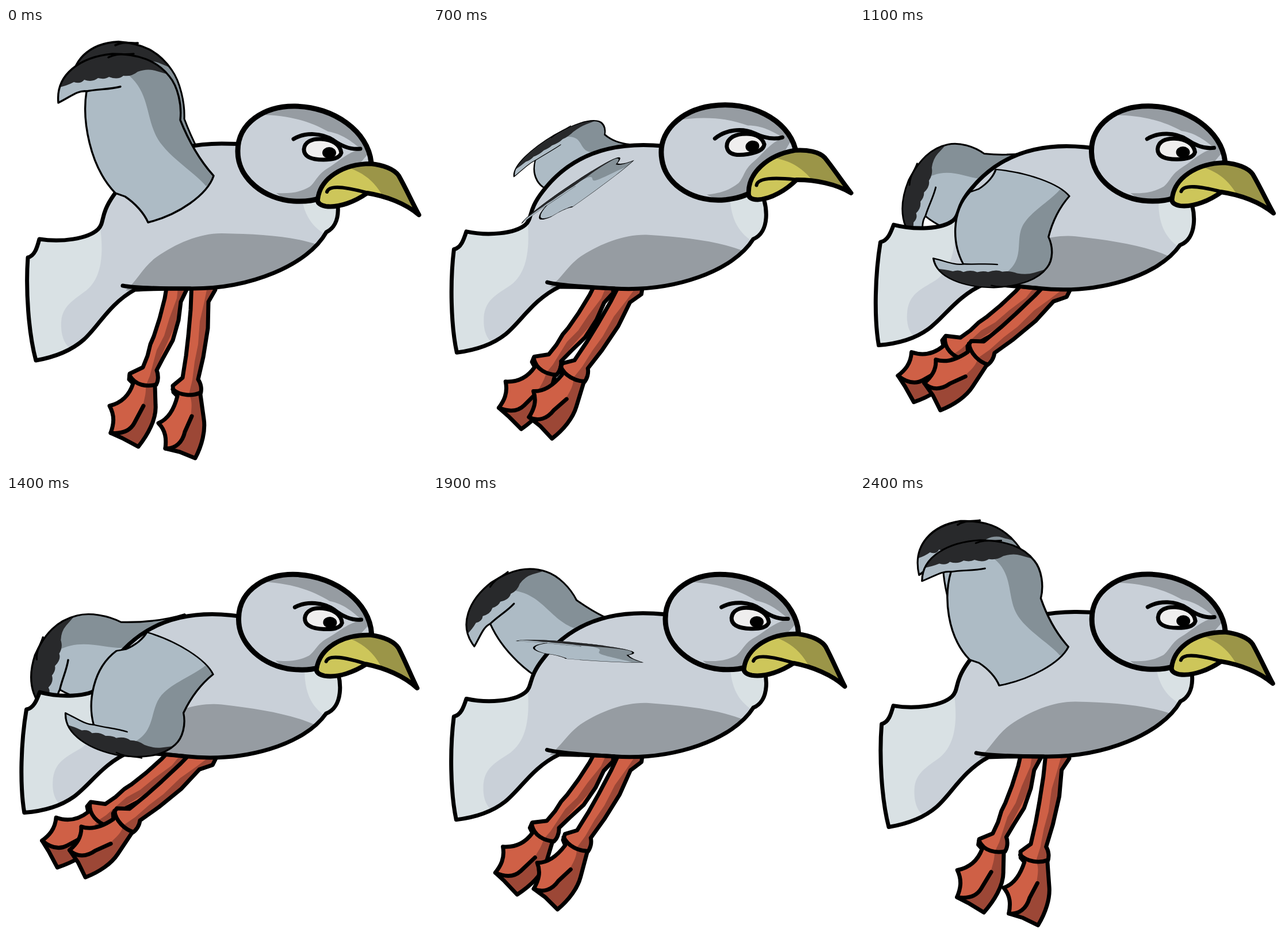
Animation of 732 by 765 pixels, one loop 2.5 s. Source, as an HTML page:

```html
<!DOCTYPE html>
<html lang="en">
<head>
<meta charset="utf-8">
<title>Flying gull</title>
<style>
  html, body { margin: 0; width: 100%; height: 100%; overflow: hidden; background: #fff; }
  svg { display: block; }
  path, ellipse { stroke-linejoin: round; stroke-linecap: round; }
  .line { fill: none; stroke: #000; stroke-width: 7; }
  .plume { fill: #c9d0d8; }
  .pale { fill: #d9e1e4; }
  .shade { fill: #969ca2; }
  .leg { fill: #cf6046; }
  .legShade { fill: #9c4736; }
</style>
</head>
<body>
<svg width="732" height="765" viewBox="0 0 732 765">
  <defs>
    <path id="bodyShape" d="M58 367C95 373 142 367 160 350C172 338 163 325 187 291C225 235 285 201 375 201L430 202L560 260C583 298 584 342 557 355C525 412 425 454 320 453C285 453 255 453 224 455C180 479 160 520 135 542C110 564 80 573 52 578C39 530 34 455 38 399C50 396 54 382 58 367Z"/>
    <path id="headShape" d="M403 215C402 165 450 135 503 136C570 137 630 180 635 234L545 296C535 300 520 302 500 301C450 298 403 262 403 215Z"/>
    <path id="beakShape" d="M542 298C546 262 585 236 634 236C655 238 675 245 683 257C696 280 706 303 718 325C695 305 660 292 628 287C608 301 580 313 556 310C546 308 541 304 542 298Z"/>
    <path id="farLegShape" d="M281 440L276 470L267 505L257 536L251 550L246 570L238 590L215 601L214 611L221 618C214 640 200 652 180 657C190 675 187 690 182 704L202 713L230 728C246 708 262 680 260 655L259 622C266 616 265 602 262 595L274 572L290 543L300 508L304 476L314 455L310 440Z"/>
    <path id="nearLegShape" d="M323 440L321 490L317 535L313 570L307 608L290 622L291 633L298 640C292 664 282 680 265 687C278 700 279 715 277 731L302 737L329 748C341 725 347 700 344 680L338 637C341 628 339 618 334 611L343 572L351 522L352 476L364 455L360 440Z"/>
    <path id="wingShape" d="M361 257C335 228 315 190 303 160C306 134 299 102 284 84C262 56 230 45 185 45C130 50 86 80 91 130C113 119 125 108 140 110C132 160 145 240 190 287L207 293C225 305 240 322 247 338C300 325 350 290 361 257Z"/>
    <clipPath id="bodyClip"><use href="#bodyShape"/></clipPath>
    <clipPath id="headClip"><use href="#headShape"/></clipPath>
    <clipPath id="beakClip"><use href="#beakShape"/></clipPath>
    <clipPath id="farLegClip"><use href="#farLegShape"/></clipPath>
    <clipPath id="nearLegClip"><use href="#nearLegShape"/></clipPath>
    <clipPath id="wingClip"><use href="#wingShape"/></clipPath>
    <g id="wing">
      <use href="#wingShape" fill="#adbbc5"/>
      <g clip-path="url(#wingClip)">
        <path fill="#849097" d="M208 78C255 112 240 165 271 203C292 230 328 252 348 275L375 257L320 150L285 60Z"/>
        <path fill="#28292b" d="M88 104Q105 101 118 94Q130 98 136 90Q150 95 160 87Q172 90 179 85Q195 91 204 83Q218 85 229 76Q245 70 259 74Q278 80 296 84L280 40L120 30Z"/>
      </g>
      <g class="line" style="stroke-width:3.4">
        <use href="#wingShape"/>
        <path d="M140 110C160 106 180 107 199 102M178 51C194 43 206 47 222 45"/>
      </g>
    </g>
  </defs>

  <use id="farWing" href="#wing"/>

  <g id="farLeg">
    <use href="#farLegShape" class="leg"/>
    <g class="legShade" clip-path="url(#farLegClip)">
      <path d="M300 440L297 470L284 505L275 535L262 560L250 605L243 622C244 640 238 650 239 657L222 689C212 704 195 706 182 704L230 735L275 690L270 570L330 440Z"/>
    </g>
    <g class="line">
      <use href="#farLegShape"/>
      <path d="M215 604C225 622 245 624 261 620M182 704C202 706 216 700 223 687L239 657"/>
    </g>
  </g>

  <g id="nearLeg">
    <use href="#nearLegShape" class="leg"/>
    <g class="legShade" clip-path="url(#nearLegClip)">
      <path d="M352 440L345 475L337 510L334 550L328 580L324 612L318 637C326 650 321 665 322 675L311 702C306 721 294 732 277 731L329 758L360 690L350 570L380 440Z"/>
    </g>
    <g class="line">
      <use href="#nearLegShape"/>
      <path d="M290 628C303 640 325 640 338 634M277 731C295 732 307 720 311 702L323 675"/>
    </g>
  </g>

  <g id="body">
    <use href="#bodyShape" class="plume"/>
    <g clip-path="url(#bodyClip)">
      <path class="pale" d="M163 340C170 390 168 432 140 456C115 475 94 485 96 520C97 545 108 555 115 560L52 590L20 480L40 350ZM512 265C512 320 530 347 562 362L600 340L580 255Z"/>
      <path class="shade" d="M208 456C228 440 238 415 262 398C295 375 335 357 375 357C440 358 500 362 542 377L500 440L320 465Z"/>
    </g>
    <g class="line">
      <use href="#bodyShape"/>
      <path d="M203 448C222 452 260 453 320 453"/>
    </g>
  </g>

  <g id="head">
    <use href="#headShape" class="plume"/>
    <g class="shade" clip-path="url(#headClip)">
      <path d="M435 151C490 150 530 163 560 180C585 184 600 197 618 211L650 225L600 120L480 120ZM650 195L618 211C592 216 580 232 556 246C541 256 538 268 528 276C510 286 495 288 470 287L500 310L560 300Z"/>
    </g>
    <use href="#headShape" class="line" style="stroke-width:9"/>
    <path fill="#efeeee" stroke="#000" stroke-width="7" d="M518 211C519 198 532 192 548 193C568 194 581 203 583 217C580 227 567 229 552 229C532 229 518 224 518 211Z"/>
    <ellipse cx="562" cy="217" rx="12" ry="10"/>
    <path class="line" d="M500 193C520 181 549 182 569 195C583 205 600 212 616 210"/>
    <use href="#beakShape" fill="#cdc65a"/>
    <path fill="#9b9548" clip-path="url(#beakClip)" d="M585 240C617 248 640 264 656 294L730 340L700 230L620 225Z"/>
    <g class="line">
      <use href="#beakShape" style="stroke-width:8"/>
      <path d="M558 285C562 272 592 277 626 286" style="stroke-width:6"/>
    </g>
  </g>

  <use id="nearWing" href="#wing"/>
</svg>
<script>
  const LOOP = 2500, STEP = 100, QUARTER = LOOP / 4;
  const part = id => document.getElementById(id);

  // Each part swings linearly between four evenly spaced poses.
  const swings = [
    ['body', 320, 360, [0, 2.4, 6.4, 3.3]],
    ['head', 490, 252, [0, -11, 2.5, 1.6]],
    ['farLeg', 295, 455, [0, 14, 38.3, 19.4]],
    ['nearLeg', 345, 455, [0, 21.9, 47.4, 23.8]]
  ];

  // Flap: turn, then squash across the wing's own axis, around a joint.
  const flap = (x, y, turn, axis, along, across, jx, jy) =>
    `translate(${x} ${y}) rotate(${turn + axis}) scale(${along} ${across}) rotate(${-axis}) translate(${-jx} ${-jy})`;

  function draw(time) {
    const t = Math.floor(time / STEP) * STEP % LOOP;
    const i = Math.floor(t / QUARTER), mix = t / QUARTER - i;
    const at = keys => keys[i] + (keys[(i + 1) % 4] - keys[i]) * mix;
    const set = (id, value) => part(id).setAttribute('transform', value);

    for (const [id, x, y, angles] of swings) set(id, `rotate(${at(angles)} ${x} ${y})`);

    set('nearWing', flap(275, 282, at([0, -26, 40, 22.5]), -17,
      1, at([1, .26, -.98, .06]), 275, 282));

    const size = at([.89, .87, .9, .91]);
    set('farWing', flap(at([310, 314, 185, 247]), at([158, 179, 231, 182]),
      at([0, -11, -78, -34]), -16, size, size * at([1.26, .3, 1.13, 1]), 303, 160));
  }

  const start = performance.now();
  function tick() {
    draw(performance.now() - start);
    requestAnimationFrame(tick);
  }
  tick();
</script>
</body>
</html>
```
